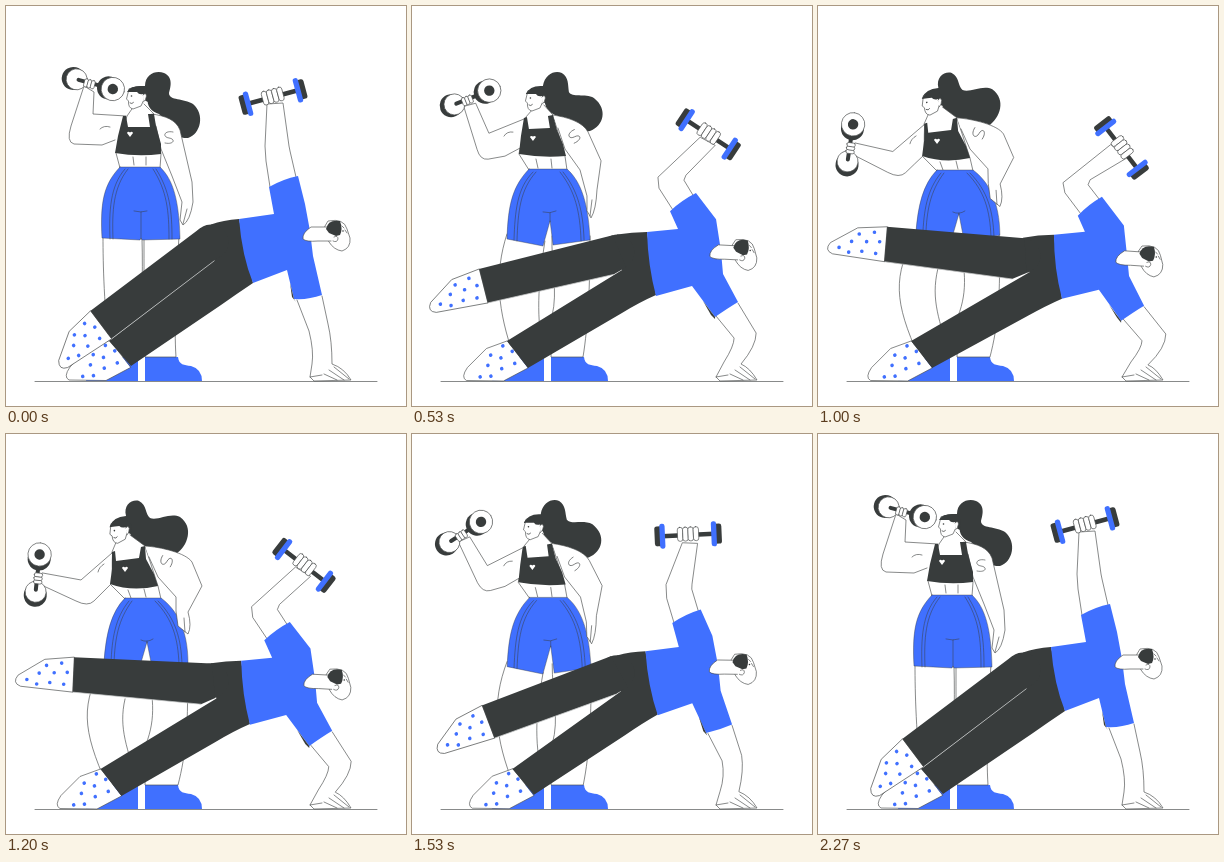
These frames come from a looping animation (400 by 400 pixels, 2.34 s). An HTML page with a canvas:

```html
<!DOCTYPE html>
<html lang="en">
<head>
<meta charset="utf-8">
<title>Workout</title>
<style>
html, body { margin: 0; width: 100%; height: 100%; overflow: hidden; background: #fff; }
canvas { display: block; width: 100vw; height: 100vh; }
</style>
</head>
<body>
<canvas id="stage"></canvas>
<script>
const LOOP = 2340, STEP = LOOP / 35;
const BLUE = '#4070ff', DARK = '#383c3c', LINE = '#484b4b', WHITE = '#fff';
const canvas = document.getElementById('stage');
const ctx = canvas.getContext('2d');
const ratio = window.devicePixelRatio || 1;
canvas.width = canvas.height = 400 * ratio;

// Motion curves: [time, value]
const curls = [[0, 0], [530, .4], [730, .775], [1200, 1], [1530, .53], [1870, 0], [LOOP, 0]];
const dips = [[0, 0], [530, .71], [730, 1], [900, 1.04], [1200, .78], [1530, .2], [1870, 0], [LOOP, 0]];
const lifts = [[0, 0], [530, 22.5], [730, 37.4], [1200, 39.7], [1530, 16.6], [1870, 0], [LOOP, 0]];

function slope(keys, i) {
  if (keys[i][1] === 0) return 0;
  const [a, b] = [keys[i - 1], keys[i + 1]];
  return (b[1] - a[1]) / (b[0] - a[0]);
}

// Cubic Hermite curve, flat at rest
function curve(keys, t) {
  let i = 0;
  while (i < keys.length - 2 && t >= keys[i + 1][0]) i++;
  const [t0, v0] = keys[i], [t1, v1] = keys[i + 1];
  const d = t1 - t0, s = (t - t0) / d, s2 = s * s, s3 = s2 * s;
  return v0 * (2 * s3 - 3 * s2 + 1) + v1 * (3 * s2 - 2 * s3)
    + d * (slope(keys, i) * (s3 - 2 * s2 + s) + slope(keys, i + 1) * (s3 - s2));
}

// Blends three poses placed at phases 0, mid and 1
function blender(mid, p) {
  const a = (p - mid) * (p - 1) / mid;
  const b = p * (p - 1) / (mid * (mid - 1));
  const c = p * (p - mid) / (1 - mid);
  const mix = (x, y, z) => x * a + y * b + z * c;
  const nums = s => s.match(/-?[\d.]+/g).map(Number);
  return {
    list: (x, y, z) => x.map((v, i) => mix(v, y[i], z[i])),
    path(x, y, z) {
      const ny = nums(y), nz = nums(z);
      let i = 0;
      return x.replace(/-?[\d.]+/g, v => { const r = mix(+v, ny[i], nz[i]).toFixed(2); i++; return r; });
    }
  };
}

function draw(path, fill, stroke, width = .65) {
  const shape = new Path2D(path);
  if (fill) { ctx.fillStyle = fill; ctx.fill(shape); }
  if (stroke) { ctx.strokeStyle = stroke; ctx.lineWidth = width; ctx.stroke(shape); }
}

function disc(x, y, r, fill, stroke) {
  ctx.beginPath();
  ctx.arc(x, y, r, 0, 7);
  ctx.fillStyle = fill;
  ctx.fill();
  if (stroke) { ctx.strokeStyle = stroke; ctx.lineWidth = .65; ctx.stroke(); }
}

function block(x, y, w, h, r, fill, stroke) {
  ctx.beginPath();
  ctx.roundRect(x - w / 2, y - h / 2, w, h, r);
  ctx.fillStyle = fill;
  ctx.fill();
  if (stroke) { ctx.strokeStyle = stroke; ctx.lineWidth = .65; ctx.stroke(); }
}

function at([x, y, degrees = 0], paint) {
  ctx.save();
  ctx.translate(x, y);
  ctx.rotate(degrees * Math.PI / 180);
  paint();
  ctx.restore();
}

function womanHead() {
  draw('M-7,-8 L-9.5,2 L-7.5,4 Q-8,11 -3,12 L5,9 L10,-2 L8,-10 Z', WHITE, LINE);
  draw('M-9,-5 Q-6,-12 8,-11 L13,-4 L12,5 L8,3 L7,-3 Q3,-2 1,-5 Q-3,-5 -9,-5 Z', DARK);
  draw('M7,-2 Q10,-5 10.5,-1 Q10,3 7.5,5', WHITE, LINE);
  disc(-4.5, -1, .8, DARK);
  draw('M-6,6 Q-4,7.5 -2.5,5.5', null, LINE, .8);
}

function roundDumbbell() {
  disc(-21.5, 0, 11.5, DARK);
  disc(-18, 0, 10.5, WHITE, LINE);
  block(-2, 0, 32, 4, 2, DARK);
  disc(15, 0, 11.5, DARK);
  disc(19.5, 0, 11.7, WHITE, LINE);
  disc(19.5, 0, 5.2, DARK);
  for (const x of [-8, -4.5, -1]) block(x, 1, 3.8, 8.5, 1.9, WHITE, LINE);
}

function woman(phase) {
  const { list, path } = blender(.4, phase);
  draw('M132,351 V375 H80 Q82,362 100,358 L108,351 Z', BLUE);
  draw('M139,351 H172 C173,359 178,359 185,360 Q196,363 196,375 H139 Z', BLUE);

  draw(path('M138,230 C138,260 138,290 138,310 L139,351 L170,351 C168,320 170,280 173,230',
            'M140,230 C139,260 146,285 140,310 L139,351 L171,351 C176,320 178,280 178,230',
            'M139,228 C148,260 150,285 140,310 L139,351 L172,351 C180,320 183,290 181,228'), WHITE, LINE);
  draw(path('M97,230 C97,260 98,300 104,351 L132,351 C136,310 137,270 136,232',
            'M95,228 C82,268 86,305 102,351 L132,351 C124,310 126,280 133,235',
            'M99,226 C74,270 76,295 101,351 L132,351 C122,315 112,295 119,265'), WHITE, LINE);

  draw(path('M122,86 Q124,79 139,80 C139,68 150,64 158,67 C167,71 165,80 163,87 C163,95 178,92 187,98 C199,108 195,128 182,132 C168,133 163,118 153,108 C146,106 140,100 142,92 Z',
            'M114,88 Q118,79 131,80 C133,68 143,64 150,67 C157,71 156,79 157,86 C160,92 173,87 182,92 C196,103 192,120 178,125 C166,127 156,117 146,110 C136,107 132,100 133,92 Z',
            'M104,92 Q107,83 120,82 C117,71 126,65 133,67 C141,71 139,80 144,84 C152,87 164,78 174,83 C188,93 182,112 170,120 C157,126 145,117 138,113 C128,112 124,104 124,95 Z'), DARK);

  draw(path('M128,100 L121,110 L110,147 L114,162 L154,162 L155,148 L148,108 L138,98',
            'M121,103 L114,111 L107,148 L117,164 L155,164 L153,150 L141,109 L132,99',
            'M111,106 L106,118 L104,150 L119,165 L155,165 L152,152 L139,112 L124,101'), WHITE, LINE);
  draw(path('M127,151 L128,159 M140,151 L140,159',
            'M124,153 L126,162 M139,153 L140,162',
            'M122,156 L125,164 M138,155 L140,163'), null, LINE);

  draw(path('M114,161 L154,161 C164,171 173,186 174,233 L136,234 L135,232 L134,234 L96,232 C94,195 98,178 114,161 Z',
            'M117,163 L155,163 C166,173 176,190 178,234 L141,239 L138,215 L131,240 L95,233 C96,197 101,180 117,163 Z',
            'M119,164 L155,164 C170,175 182,195 182,229 L146,233 L141,208 L134,232 L98,228 C100,200 105,178 119,164 Z'), BLUE, DARK, .4);
  draw(path('M119,163 C104,180 103,205 104,233 M122,163 C107,182 106,205 107,233 M150,163 C164,185 166,205 166,233 M147,163 C161,185 163,205 163,233 M128,205 Q135,207 141,205 M135,206 L135,233',
            'M121,166 C105,182 103,205 102,234 M124,166 C108,184 106,205 105,235 M151,166 C166,185 171,205 172,234 M148,166 C163,185 168,205 169,235 M131,206 Q138,208 144,205 M138,207 L138,216',
            'M123,167 C109,184 106,205 105,229 M126,167 C112,186 109,205 108,229 M152,167 C170,185 175,205 176,230 M149,167 C167,185 172,205 173,230 M135,206 Q141,209 147,205 M141,207 L141,209'), null, DARK, .5);

  draw(path('M146,108 C160,110 170,114 174,124 L186,176 L187,196 Q184,215 177,219 L174,214 L176,196 L166,170 L155,143 L150,120',
            'M141,109 C155,111 171,116 176,126 L189,155 L185,184 Q184,204 179,212 L175,205 L175,190 L168,164 L153,143 L146,122',
            'M139,112 C155,113 180,119 186,128 L196,152 L182,178 Q186,192 182,200 L172,192 L170,177 L170,163 L152,143 L143,123'), WHITE, LINE);
  draw(path('M181,203 L177,218', 'M180,194 L178,210', 'M178,184 L179,198'), null, LINE);
  at(list([163, 131, 0], [162, 130, -35], [160, 127, -70]), () =>
    draw('M4,-5 C-5,-7 -7,0 0,1 C7,2 5,8 -4,6', null, LINE));

  draw(path('M120,110 L87,108 L88,86 L78,80 L65,120 Q60,136 68,138 L96,139 L109,134',
            'M112,113 L77,127 L64,97 L52,100 L65,143 Q68,154 76,153 L93,150 L108,142',
            'M106,119 L75,146 L36,139 L33,150 L70,167 Q82,173 88,167 L97,158 L105,150'), WHITE, LINE);
  draw(path('M94,123 Q98,119 104,121', 'M92,130 Q95,125 101,126', 'M92,138 Q93,133 98,130'), null, LINE);

  draw(path('M117,110 L120,110 L122,121 L144,121 L142,108 L148,108 L150,120 L155,138 L155,148 Q132,151 109,147 L112,130 Z',
            'M112,112 L115,111 L117,123 L138,122 L136,110 L141,109 L145,124 L151,138 L154,150 Q130,152 107,148 L109,130 Z',
            'M106,118 L109,117 L110,127 L133,124 L135,113 L139,112 L140,125 L148,140 L152,152 Q126,158 104,150 L106,135 Z'), DARK);
  at(list([124, 128], [121, 132], [119, 135]), () =>
    draw('M0,3 L-3,-1 Q-2,-3 0,-1.5 Q2,-3 3,-1 Z', WHITE));
  at(list([130, 91, 0], [123, 93, 0], [113, 97, -8]), womanHead);
  at(list([88, 78, 15], [59.5, 91.5, -21], [31.5, 140, -84]), roundDumbbell);
}

const DOTS = [[-12, -11], [-27, -8], [-6, -2], [-19, -1], [-34, 0], [-46, 7], [-9, 10], [-23, 9], [-36, 11]];
const dots = () => DOTS.forEach(([x, y]) => disc(x, y, 1.8, BLUE));

function barDumbbell() {
  block(0, 0, 54, 4.5, 1, DARK);
  for (const side of [-1, 1]) {
    block(side * 29.3, 0, 8.5, 20, 2.5, DARK);
    block(side * 25.8, 0, 5.3, 25, 2.5, BLUE);
  }
  for (const x of [-8, -2.7, 2.6, 7.9]) block(x, -1, 5.3, 14, 2.5, WHITE, LINE);
}

function manHead() {
  draw('M-11,-9 L-8,-14 Q8,-17 11,-6 L14,3 Q15,13 6,16 Q-2,15 -7,7 Z', WHITE, LINE);
  const neck = 'M-8,-8 L-25,-8 Q-34,-2 -33,4 Q-30,7 -18,6 L-5,6';
  draw(neck + ' L-1,0 Z', WHITE);
  draw(neck, null, LINE);
  draw('M-10,-6 Q-8,-16 4,-14 Q7,-6 4,0 L0,1 L-7,-2 Z', DARK);
  draw('M-2,2 Q2,0 2,4 Q1,8 -3,6', WHITE, LINE);
  disc(7, -4, .8, DARK);
  draw('M6,-9 L8,-7 M9,-5 L11,-2', null, LINE);
}

function man(phase, lift) {
  const { list, path } = blender(.71, phase);
  draw(path('M291,294 L303,325 Q308,345 306,358 L304,371 L308,375 L345,374 Q338,362 326,358 Q326,335 322,318 L316,290',
            'M304,310 L322,332 Q322,340 312,356 L304,371 L308,375 L345,374 Q338,362 329,358 Q344,340 344,327 L326,297',
            'M305,313 L324,335 Q324,342 313,356 L304,371 L308,375 L345,374 Q338,362 330,359 Q348,342 348,328 L326,301'), WHITE, LINE);
  draw('M318,368 L331,374 M323,364 L338,374 M328,361 L343,373 M304,371 L316,369', null, LINE);

  draw(path('M264,181 L260,155 L259,140 L261,98 L277,97 L283,140 L284,145 L290,171',
            'M261,204 L247,182 L246,171 L288,131 L303,139 L274,169 L272,174 L281,189',
            'M263,208 L247,187 L245,177 L293,139 L309,153 L272,174 L270,179 L281,193'), WHITE, LINE);
  at(list([267, 91, -15], [296, 128, 33], [304, 143, 54]), barDumbbell);

  at(list([114, 348], [105.5, 348.5], [103.5, 348.5]), () => {
    draw('M-10.5,-13.5 L-31,-6 L-50,13 Q-57,23 -51,26 L-14,26.5 L10.5,13.5 Z', WHITE, LINE);
    at([1, -4, -26], dots);
  });
  draw(path('M233,213 L247,277 Q232,287 215,299 L125,360 L103,335 L209,254 L205,218.5 Q217,214 233,213 Z',
            'M235,226 L244,289 Q228,296 210,307 L116,362 L95,335 L210,264 L205,228.5 Q220,226 235,226 Z',
            'M236,229 L244,293 Q228,300 210,310 L114,362 L93,335 L212,266 L205,232 Q220,229 236,229 Z'), DARK);

  // The thigh opens out as the leg rises
  const thigh = 17 + lift * .17;
  const [hipX, hipY] = list([205, 236], [205, 246], [205, 250]);
  at([hipX, hipY, lift - 37], () => {
    disc(0, 0, 17.5, DARK);
    draw(`M0,-17.5 H-138 V17.5 L-9,${thigh} L5,17 Z`, DARK);
    draw(`M-138,17.5 L-9,${thigh}`, null, '#c8caca', .7);
    at([-138, 0], () => {
      draw('M0,-17.5 L-29,-14 L-55,3 Q-61,11 -52,14 L0,17.5 Z', WHITE, LINE);
      dots();
    });
  });

  draw(path('M263,181 Q277,173 292,170 L299,198 L304,225 L307,250 L316,289 Q302,294 288,293 L281,264 L247,277 Q236,250 233,213 L268,208 Z',
            'M258,205 Q270,194 284,187 L304,213 L309,245 L311,268 L326,296 Q316,302 303,311 L280,280 L244,290 Q236,260 235,226 L266,223 Z',
            'M260,210 Q270,199 284,191 L306,220 L309,250 L311,270 L326,300 Q316,306 303,315 L281,284 L244,293 Q236,263 236,229 L267,226 Z'), BLUE);
  draw(path('M284,277 L288,293 L290,296 L286,291 Z',
            'M291,295 L303,311 L303,313 L299,309 Z',
            'M291,299 L303,315 L303,317 L299,312 Z'), DARK);
  at(list([330, 229, 0], [331, 248, 3], [331, 255, 4]), manHead);
}

function render(now) {
  const time = Math.floor((now % LOOP) / STEP + .15) % 35 * STEP;
  ctx.setTransform(ratio, 0, 0, ratio, 0, 0);
  ctx.fillStyle = WHITE;
  ctx.fillRect(0, 0, 400, 400);
  ctx.lineJoin = ctx.lineCap = 'round';
  woman(curve(curls, time));
  man(curve(dips, time), curve(lifts, time));
  draw('M29,375.5 H371', null, LINE);
}

function tick() {
  render(performance.now());
  requestAnimationFrame(tick);
}
tick();
</script>
</body>
</html>
```
